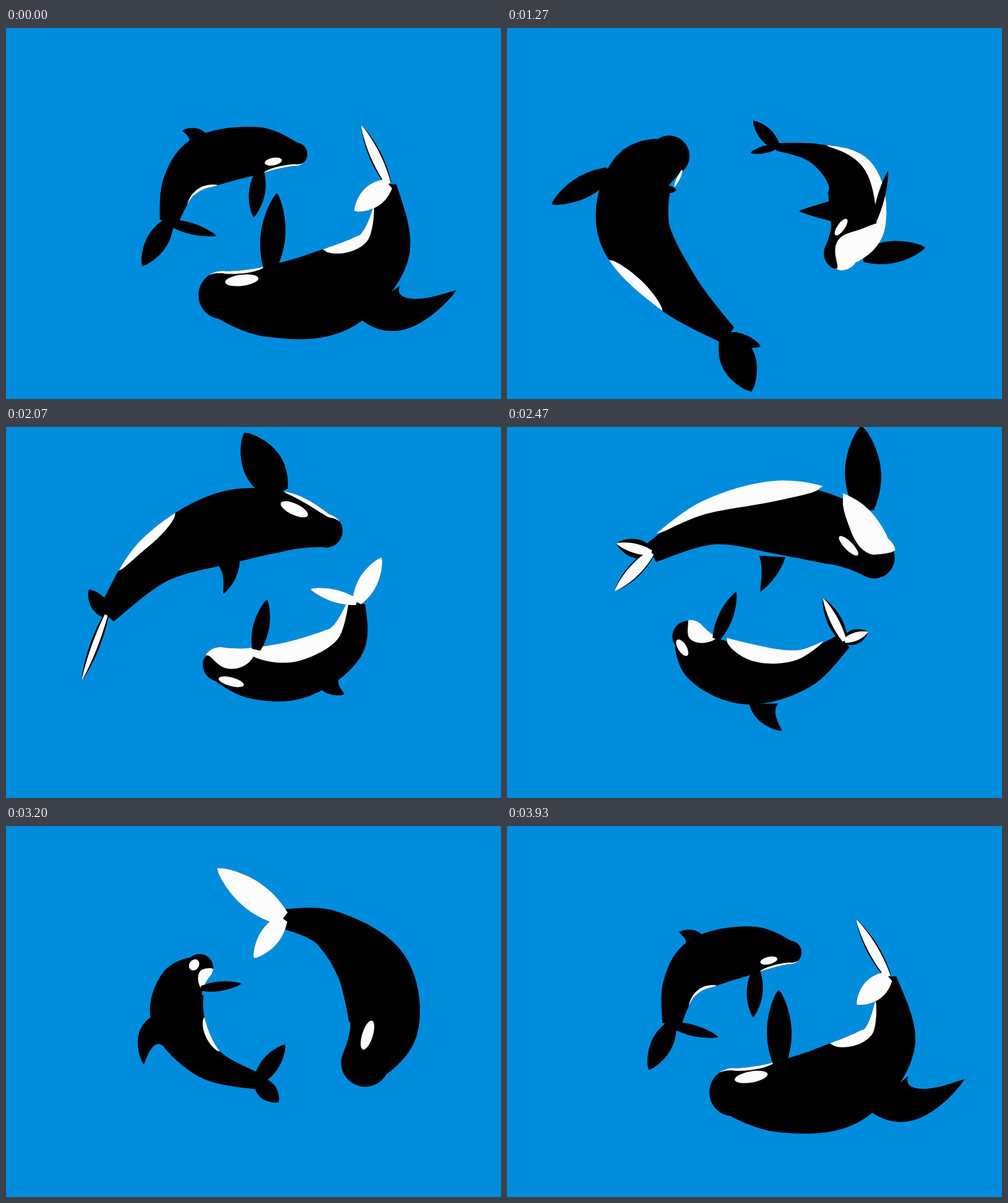
Recreate the animation shown at these times as an HTML page with a canvas. Size 800x600 px, loop 3.97 s.

```html
<!DOCTYPE html>
<html lang="en">
<head>
<meta charset="utf-8">
<title>Circling orcas</title>
<style>
html, body { margin: 0; width: 100%; height: 100%; overflow: hidden; background: #008cdd; }
canvas { display: block; width: 100vw; height: 100vh; }
</style>
</head>
<body>
<canvas id="sea" width="800" height="600"></canvas>
<script>
const ctx = document.getElementById('sea').getContext('2d');
const LOOP = 3970, STEPS = 119, SEA = '#008cdd', BLACK = '#000', WHITE = '#fcfcfc';
const CX = 415, CY = 310, NOSE = .15;

// Pose times in steps, and how far the pair has turned at each of them.
const keys = [0, 19, 38, 62, 86, 106, 118];
const turn = [0, 44, 104, 188, 244, 318, 357].map((d, i) => d - 360 * keys[i] / STEPS);

// A whale is a bent tube with leaf-shaped fins and white bands along its sides.
//   spine: x, y, radius from head to tail     fins: tip x, y, half width, place s, v
//   flukes: tip x, y, half width, whiteness   eye: x, y, radii, angle to the turn
//   bands: from s, to s, side, depth
// s runs from head (0) to tail (1), v from inner (-1) to outer (1) side.
const calf = {
  drift: (x, y) => [
    x - 11 - .034 * (x - 486) + .063 * (y - 212),
    y - .03 * (x - 486) + .008 * (y - 212)],
  spine: [
    [[468, 204, 19], [408, 198, 38], [325, 215, 43], [281, 254, 29], [263, 314, 15]],
    [[572, 272, 21], [534, 232, 37], [455, 200, 38], [380, 196, 26], [306, 218, 12]],
    [[540, 364, 28], [566, 318, 45], [556, 243, 42], [500, 204, 17], [436, 192, 6]],
    [[346, 384, 28], [402, 398, 42], [474, 391, 47], [546, 350, 35], [567, 283, 14]],
    [[273, 276, 23], [268, 320, 41], [318, 372, 44], [400, 394, 24], [492, 389, 12]],
    [[364, 206, 21], [322, 218, 36], [279, 247, 42], [270, 322, 31], [323, 377, 15]]],
  dorsal: [
    [285, 166, 17, .5, .9], null, [472, 296, 17, .33, -.9],
    [547, 432, 18, .6, .9], [319, 468, 28, .5, .9], [201, 255, 20, .52, .9]],
  near: [
    [400, 306, 13, .25, -.9], [536, 291, 14, .12, -.8], [616, 231, 6, .28, .6],
    [422, 279, 13, .25, -.9], [339, 242, 9, .1, -.9], [385, 291, 8, .2, -.9]],
  far: [null, [587, 153, 21, .1, .9], [676, 355, 18, .1, .9], null, null, null],
  flukeOut: [
    [220, 385, 17, 0], [234, 198, 17, 0], [398, 150, 11, 0],
    [607, 211, 15, 1], [500, 406, 10, 0], [352, 465, 20, 0]],
  flukeIn: [
    [340, 336, 9, 0], [299, 300, 12, 0], [393, 202, 6, 0],
    [492, 262, 10, 1], [519, 313, 13, 0], [387, 331, 14, 0]],
  eye: [
    [432, 216, 14, 6, -10], [569, 226, 16, 6, 21], [540, 322, 16, 6, 21],
    [364, 412, 21, 7, 7], [259, 271, 9, 7, 36], [350, 210, 12, 8, 7]],
  chin: [
    [-.12, .22, -1, .15], [-.12, .12, 1, .12], [-.15, .28, 1, 1.5],
    [-.15, .25, -1, 1.1], [-.1, .1, -1, .9], [-.1, .2, -1, .6]],
  belly: [
    [.5, .85, -1, .15], [.3, .6, 1, 0], [.12, .72, 1, .4],
    [.15, 1, -1, .75], [.45, .77, -1, .3], [.58, .8, -1, .2]]
};

const mother = {
  drift: (x, y) => [
    x + 15 - .01 * (x - 350) + .085 * (y - 420),
    y - .035 * (x - 312) - .013 * (y - 425)],
  spine: [
    [[350, 432, 39], [425, 442, 58], [525, 425, 68], [608, 358, 46], [618, 252, 13]],
    [[209, 337, 35], [238, 382, 56], [345, 437, 61], [462, 446, 42], [568, 412, 20]],
    [[262, 207, 33], [215, 243, 53], [206, 330, 58], [272, 424, 40], [357, 497, 16]],
    [[517, 168, 27], [447, 153, 49], [352, 164, 58], [243, 214, 40], [162, 304, 16]],
    [[635, 293, 40], [607, 233, 58], [526, 175, 54], [430, 151, 30], [340, 165, 17]],
    [[496, 421, 37], [568, 400, 55], [618, 335, 62], [604, 238, 37], [547, 190, 14]]],
  dorsal: [
    [728, 424, 42, .62, .9], null, null,
    [351, 270, 19, .52, -.9], [478, 266, 22, .48, -.9], [714, 316, 28, .5, .9]],
  near: [
    [438, 267, 20, .26, -.9], [377, 348, 9, .4, -.9], [274, 262, 6, .22, -.8],
    null, null, [584, 239, 19, .33, -.7]],
  far: [
    null, [244, 531, 16, .28, .9], [72, 285, 18, .28, .9],
    [385, 9, 32, .27, .9], [720, 124, 23, .14, .9], [456, 326, 12, .22, -.9]],
  flukeOut: [
    [574, 157, 10, .8], [649, 455, 22, 0], [395, 588, 28, 0],
    [134, 263, 13, 0], [222, 139, 20, 1], [486, 79, 23, 1]],
  flukeIn: [
    [563, 296, 18, 1], [510, 323, 18, 0], [410, 515, 10, 0],
    [122, 411, 8, .6], [305, 201, 15, 1], [454, 250, 17, 1]],
  eye: [
    [381, 408, 27, 9, 173], [250, 323, 15, 2.5, 173], [277, 243, 15, 2.5, 191],
    [466, 133, 24, 9, 197], [584, 280, 19, 5, 183], [554, 407, 30, 12, 190]],
  chin: [
    [-.1, .23, -1, .12], [0, .1, -1, 0], [0, .1, 1, 0],
    [-.1, .25, 1, .2], [-.08, .3, 1, 1.7], [-.14, .25, -1, .8]],
  belly: [
    [.55, .9, -1, .4], [.6, .8, 1, 0], [.55, .77, 1, .35],
    [.63, .85, 1, .4], [.15, 1, 1, .9], [.58, 1, -1, 1.3]]
};

const rad = d => d * Math.PI / 180;
const clamp = (x, a, b) => Math.max(a, Math.min(b, x));
const steps = (n, fn) => Array.from({ length: n + 1 }, (_, i) => fn(i / n));

function rotate([x, y], deg) {
  const c = Math.cos(rad(deg)), s = Math.sin(rad(deg));
  return [x * c - y * s, x * s + y * c];
}

// One track per number; places are kept in a frame that turns with the pair.
function tracks(whale, poses, placed) {
  const full = poses.map((p, k) => p || [...whale.spine[k][1].slice(0, 2), 0, .25, 0]);
  const last = full[0].slice();
  if (placed) last.splice(0, 2, ...whale.drift(last[0], last[1]));
  full.push(last);
  const local = full.map(([x, y, ...rest], k) => placed
    ? [...rotate([x - CX, y - CY], -turn[k] - 360 * keys[k] / STEPS), ...rest]
    : [x, y, ...rest]);
  return local[0].map((_, i) => local.map(p => p[i]));
}

const count = keys.length;
const span = i => (i + 1 < count ? keys[i + 1] : STEPS) - keys[i];

function slope(v, i) {
  const j = (i + count - 1) % count, k = (i + 1) % count;
  return ((v[i] - v[j]) / span(j) + (v[k] - v[i]) / span(i)) / 2;
}

function sample(v, n) {
  let i = count - 1;
  while (keys[i] > n) i--;
  const k = (i + 1) % count, h = span(i), u = (n - keys[i]) / h, w = 1 - u;
  return v[i] * (1 + 2 * u) * w * w + v[k] * u * u * (3 - 2 * u)
    + h * u * w * (slope(v, i) * w - slope(v, k) * u);
}

function prepare(whale) {
  const rig = {};
  for (const name of ['dorsal', 'near', 'far', 'flukeOut', 'flukeIn', 'eye'])
    rig[name] = tracks(whale, whale[name], true);
  for (const name of ['chin', 'belly']) rig[name] = tracks(whale, whale[name], false);
  rig.spine = whale.spine[0].map((_, i) => tracks(whale, whale.spine.map(p => p[i]), true));
  return rig;
}

function curve(a, b, c, d, u) {
  return b + .5 * u * (c - a + u * (2 * a - 5 * b + 4 * c - d + u * (3 * (b - c) + d - a)));
}

// Maps body coordinates (s, v) to the stage; s below 0 is the rounded nose.
function bodyMap(spine) {
  const end = spine.length - 1;
  const at = s => {
    const t = clamp(s, 0, 1) * end, i = Math.min(end - 1, Math.floor(t));
    const [a, b, c, d] = [i - 1, i, i + 1, i + 2].map(j => spine[clamp(j, 0, end)]);
    return [0, 1, 2].map(q => curve(a[q], b[q], c[q], d[q], t - i));
  };
  return (s, v) => {
    const [x, y, r] = at(s), p = at(Math.max(0, s) - .01), q = at(Math.max(0, s) + .01);
    const dx = q[0] - p[0], dy = q[1] - p[1], len = Math.hypot(dx, dy);
    const k = clamp(-s / NOSE, 0, 1), w = r * Math.sqrt(1 - k * k) * v;
    return [x - (dx * k * r + dy * w) / len, y - (dy * k * r - dx * w) / len];
  };
}

function fill(pts, color) {
  ctx.beginPath();
  pts.forEach(p => ctx.lineTo(...p));
  ctx.fillStyle = color;
  ctx.fill();
}

// A shape grown along a bent line, its half width given by a profile.
function leaf(base, mid, tip, width, profile, color) {
  const left = [], right = [];
  steps(20, u => {
    const w = 1 - u;
    const [x, y] = [0, 1].map(q => base[q] * w * w + 2 * mid[q] * u * w + tip[q] * u * u);
    const [dx, dy] = [0, 1].map(q => (mid[q] - base[q]) * w + (tip[q] - mid[q]) * u);
    const h = Math.max(0, width) * profile(u) / (Math.hypot(dx, dy) || 1);
    left.push([x - dy * h, y + dx * h]);
    right.unshift([x + dy * h, y - dx * h]);
  });
  fill([...left, ...right], color);
}

const paddle = u => Math.sin(Math.PI * (.14 + .86 * u)) ** .75;
const hook = u => (1 - u) ** .8;
const middle = (a, b) => [(a[0] + b[0]) / 2, (a[1] + b[1]) / 2];

function band(body, [from, to, side, depth]) {
  const place = u => from + (to - from) * u;
  const rim = steps(30, u => body(place(u), side));
  const inner = steps(30, u => body(place(u),
    side * (1 - Math.max(0, depth) * Math.sin(Math.PI * u) ** .6)));
  fill([...rim, ...inner.reverse()], WHITE);
}

function drawWhale(rig, n, angle) {
  const read = list => list.map(v => sample(v, n));
  const placed = list => {
    const [x, y, ...rest] = read(list), p = rotate([x, y], angle);
    return [p[0] + CX, p[1] + CY, ...rest];
  };
  const body = bodyMap(rig.spine.map(placed));
  const paddleFin = name => {
    const [x, y, w, s, v] = placed(rig[name]), base = body(s, v);
    leaf(base, middle(base, [x, y]), [x, y], w, paddle, BLACK);
  };
  const flukes = [rig.flukeOut, rig.flukeIn].map(placed);
  const tail = body(1, 0);
  const drawFluke = ([x, y, w], part, color) =>
    leaf(tail, middle(tail, [x, y]), [x, y], w * part, paddle, color);

  paddleFin('far');

  // The back fin leaves the body at a right angle and sweeps to its tip.
  const [x, y, w, s, v] = placed(rig.dorsal);
  const base = body(s, v), root = body(s, 0);
  const reach = .45 * Math.hypot(x - base[0], y - base[1]);
  const out = Math.hypot(base[0] - root[0], base[1] - root[1]) || 1;
  const mid = [0, 1].map(q => base[q] + (base[q] - root[q]) / out * reach);
  leaf(base, mid, [x, y], w, hook, BLACK);

  flukes.forEach(f => drawFluke(f, 1, BLACK));
  const stations = [
    ...steps(10, u => -NOSE * Math.cos(u * Math.PI / 2)),
    ...steps(40, u => u)];
  fill([
    ...stations.map(t => body(t, 1)),
    ...stations.reverse().map(t => body(t, -1))], BLACK);
  flukes.forEach(f => drawFluke(f, clamp(f[3], 0, 1), WHITE));
  band(body, read(rig.belly));
  band(body, read(rig.chin));

  const [ex, ey, rx, ry, tilt] = placed(rig.eye);
  ctx.beginPath();
  ctx.ellipse(ex, ey, Math.max(0, rx), Math.max(0, ry), rad(tilt + angle), 0, 2 * Math.PI);
  ctx.fill();

  paddleFin('near');
}

const rigs = [calf, mother].map(prepare);

function draw(n) {
  const angle = sample(turn, n) + 360 * n / STEPS;
  ctx.fillStyle = SEA;
  ctx.fillRect(0, 0, 800, 600);
  rigs.forEach(rig => drawWhale(rig, n, angle));
}

// Three steps per 100 ms, held for 30, 40 and 30 ms.
function stepAt(ms) {
  const r = ms % 100;
  return 3 * Math.floor(ms / 100) + (r >= 70 ? 2 : r >= 30 ? 1 : 0);
}

const start = performance.now();
function tick() {
  draw(stepAt((performance.now() - start) % LOOP));
  requestAnimationFrame(tick);
}
tick();
</script>
</body>
</html>
```
